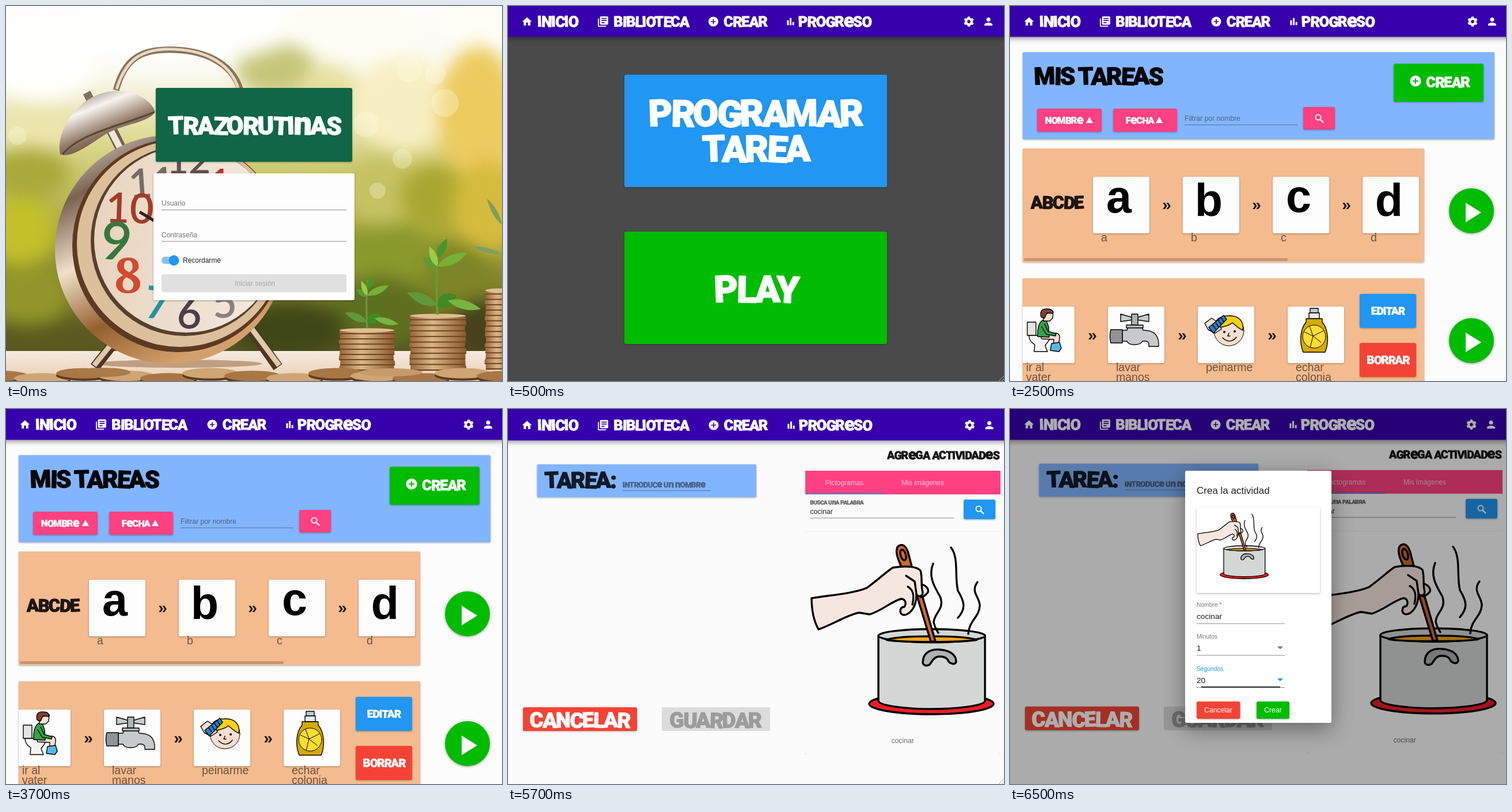
Animation of 861 by 650 pixels, one loop 8000 ms. Source, as an HTML page:

```html
<!DOCTYPE html>
<html lang="es">
<head>
<meta charset="utf-8">
<title>Rutinas</title>
<style>
html, body { margin: 0; width: 100%; height: 100%; overflow: hidden; background: #fcfcfc; }
svg { display: block; width: 100vw; height: 100vh; }
text { font-family: "Liberation Sans", Arial, sans-serif; white-space: pre; }
.d { font-family: Roboto, "Open Sans", sans-serif; font-weight: 900; letter-spacing: -.05em;
  fill: currentColor; stroke: currentColor; stroke-width: .03em; stroke-linejoin: round; }
.d tspan { font-size: 1.3em; letter-spacing: -.04em; }
.sh { filter: drop-shadow(0 1.5px 1.5px rgba(0,0,0,.32)); }
.bar { filter: drop-shadow(0 3px 4px rgba(0,0,0,.4)); }
.big { filter: drop-shadow(0 10px 18px rgba(0,0,0,.4)); }
.blur { filter: blur(15px); }
.ink { stroke: #000; stroke-linejoin: round; stroke-linecap: round; }
</style>
</head>
<body>
<svg id="stage" viewBox="0 0 861 650" preserveAspectRatio="none"></svg>
<script>
const BLUE = '#2196f3', GREEN = '#00bc00', PINK = '#ff4081', RED = '#f44336';

const rect = (x, y, w, h, fill, cls = '', rx = 0) =>
  `<rect x="${x}" y="${y}" width="${w}" height="${h}" rx="${rx}" fill="${fill}" class="${cls}"/>`;
const box = (x, y, w, h, fill) => rect(x, y, w, h, fill, 'sh', 3);
const oval = (x, y, rx, ry, fill, more = '') =>
  `<ellipse cx="${x}" cy="${y}" rx="${rx}" ry="${ry}" fill="${fill}" ${more}/>`;
const path = (d, fill = 'none', stroke = 'none', w = 1, more = '') =>
  `<path d="${d}" fill="${fill}" stroke="${stroke}" stroke-width="${w}" ${more}/>`;
const ink = (d, fill = 'none', w = 1.4) => path(d, fill, '#000', w, 'class="ink"');
const text = (x, y, size, s, fill, more = '') =>
  `<text x="${x}" y="${y}" font-size="${size}" fill="${fill}" ${more}>${s}</text>`;
const MID = 'text-anchor="middle"';
// Display lettering: every glyph leans a little, lowercase forms are drawn at capital height.
const lean = s => [...s].map((_, i) => [-2, 1.5, -1, 2.5][i % 4]).join(' ');
const title = (x, y, size, s, color, more = '') =>
  `<text class="d" x="${x}" y="${y}" font-size="${size}" rotate="${lean(s)}" style="color:${color}" ${more}>` +
  s.replace(/[en]/g, '<tspan>$&</tspan>') + '</text>';
const move = (x, y, s, turn = 0, k = 1) =>
  `<g transform="translate(${x} ${y}) rotate(${turn}) scale(${k})">${s}</g>`;

const ICONS = {
  home: 'M10 20v-6h4v6h5v-8h3L12 3 2 12h3v8z',
  books: 'M4 6H2v14c0 1.1.9 2 2 2h14v-2H4zM20 2H8c-1.1 0-2 .9-2 2v12c0 1.1.9 2 2 2h12c1.1 0 2-.9 2-2V4c0-1.1-.9-2-2-2zm-1 9H9V9h10zm-4 4H9v-2h6zm4-8H9V5h10z',
  add: 'M12 2a10 10 0 1 0 0 20 10 10 0 1 0 0-20zm5 11h-4v4h-2v-4H7v-2h4V7h2v4h4z',
  bars: 'M4 9h4v11H4zM16 13h4v7h-4zM10 4h4v16h-4z',
  person: 'M12 12a4 4 0 1 0 0-8 4 4 0 1 0 0 8zm0 2c-2.67 0-8 1.34-8 4v2h16v-2c0-2.66-5.33-4-8-4z'
};
const icon = (name, cx, cy, size) =>
  move(cx - size / 2, cy - size / 2, path(ICONS[name], '#fff', 'none', 1, 'fill-rule="evenodd"'), 0, size / 24);
const gear = (x, y) => move(x, y,
  '<circle r="5" fill="none" stroke="#fff" stroke-width="4.2"/>' +
  '<circle r="7.4" fill="none" stroke="#fff" stroke-width="2.6" stroke-dasharray="4 3.75" transform="rotate(-106)"/>');
const search = (x, y) => move(x, y,
  '<circle cx="-2" cy="-2" r="4.6" fill="none" stroke="#fff" stroke-width="1.9"/>' +
  path('M1.5 1.5L7 7', 'none', '#fff', 2.4));

function nav(y, crear, prog, right) {
  return rect(-15, -15, 891, y + 41.5, '#3700ad', 'bar') +
    icon('home', 33, y, 20) + title(51, y + 9, 26.5, 'INICIO', '#fff') +
    icon('books', 165, y, 21.5) + title(183.5, y + 9, 25.5, 'BIBLIOTECA', '#fff') +
    icon('add', crear - 18, y, 20.5) + title(crear, y + 9, 25.5, 'CREAR', '#fff') +
    icon('bars', prog - 13.5, y, 18.5) + title(prog, y + 9, 25.5, 'PROGReSO', '#fff') +
    gear(right, y) + icon('person', right + 34, y, 21);
}
const grip = path('M852 650L861 641M857 650L861 646', 'none', '#aaa', 1);

// ---- Login ----
const leaf = (x, y, len, turn, w = 8, fill = '#5d9a32') =>
  move(x, y, path(`M0 0Q${len * .4} ${-w} ${len} 0Q${len * .5} ${w} 0 0Z`, fill), turn);

function stack(x, top, w, bottom) {
  let s = '';
  const n = Math.round((bottom - top) / 9.5), h = (bottom - top) / n;
  for (let i = n - 1; i >= 0; i--) {
    const cx = x + w / 2 + Math.sin(i * 2.3) * 1.2, y = top + i * h;
    s += rect(cx - w / 2, y, w, h + 1, 'url(#coin)', '', 3) + rect(cx - w / 2, y + h - 2, w, 2, '#6d4526');
  }
  return s + oval(x + w / 2, top + 2, w / 2, 3.5, '#e0bf92');
}

function clock() {
  const num = (x, y, size, s, fill, turn = 0, font = 'Lato,sans-serif') =>
    move(x, y, text(0, 0, size, s, fill, `${MID} style="font-family:${font};font-weight:600"`), turn);
  return path('M191 146C204 98 228 77 275 76C340 74 392 96 407 146', 'none', '#8b7359', 11) +
    path('M192 144C206 98 230 77 275 75C340 73 388 96 403 142', 'none', '#e6d9c6', 5) +
    path('M180 208L202 252', 'none', '#75604d', 19) + path('M178 208L200 250', 'none', '#efe6da', 11) +
    path('M152 174L140 150', 'none', '#85715f', 14) +
    path('M94 257C86 216 125 158 176 149C212 141 253 160 259 184C244 204 204 203 170 224C139 245 111 264 94 257Z', 'url(#bell)') +
    path('M98 257C130 219 206 206 257 184', 'none', '#5a4433', 3) +
    path('M208 558L154 626M424 558L472 626', 'none', '#4e3625', 18) +
    path('M204 560L153 623M427 560L474 623', 'none', '#e2c9ab', 9) +
    oval(285, 422, 200, 198, 'url(#rim)') +
    oval(299, 415, 184, 185, '#5c3a22') + oval(302, 412, 179, 179, '#dcbf9b') +
    oval(310, 407, 163, 165, '#58402f') + oval(313, 405, 160, 161, 'url(#face)') +
    num(255, 331, 70, '11', '#756b69', -4) + num(317, 291, 66, '12', '#61504e') +
    num(372, 326, 62, '1', '#b5362c') + num(214, 376, 72, '10', '#a43b2b', 2) +
    num(188, 440, 92, '9', '#35783d', 6) +
    num(212, 497, 84, '8', '#d04a31', 0, 'Noto Serif,serif') +
    num(261, 542, 78, '7', '#2791a9', 6) + num(318, 559, 74, '6', '#4b3f4b') +
    num(381, 540, 74, '5', '#8d807c', -4) +
    path('M232 357L270 380', 'none', '#2a211f', 5);
}

function plant(x, y, h, k) {
  return path(`M${x} ${y}Q${x - 3} ${y - h / 2} ${x + 1} ${y - h}`, 'none', '#689a37', 4 * k) +
    leaf(x, y - 15 * k, 52 * k, -158, 16 * k, '#62973a') + leaf(x, y - 13 * k, 35 * k, -32, 22 * k, '#3f8a22') +
    leaf(x + 16 * k, y - 22 * k, 54 * k, 14, 14 * k, '#78b540') +
    leaf(x, y - h * .66, 28 * k, -145, 13 * k) + leaf(x, y - h * .68, 52 * k, -25, 15 * k, '#76b036') +
    leaf(x, y - h * .68, 34 * k, -112, 11 * k, '#9acb4b') + leaf(x, y - h * .8, 34 * k, -64, 12 * k, '#4e9328');
}

function photo() {
  const glows = [
    [45, 215, 70, 38, '#ede5ad'], [40, 290, 70, 45, '#a9a93c'], [25, 390, 60, 60, '#c3c02b'], [40, 500, 70, 55, '#92962a'],
    [70, 580, 130, 28, '#5a5a20'], [470, 110, 70, 45, '#c6c679'], [560, 170, 60, 70, '#e6e0a0'],
    [690, 170, 90, 80, '#f7efc4'], [820, 190, 70, 120, '#eccb5f'], [650, 320, 60, 60, '#c5c263'], [745, 330, 60, 55, '#a9a730'],
    [835, 350, 60, 80, '#d5bb3d'], [660, 440, 90, 60, '#8a982c'], [650, 530, 90, 60, '#5f6f20'], [490, 560, 100, 45, '#3f4718'],
    [785, 470, 60, 60, '#7c8527'], [830, 560, 60, 50, '#46421c'], [840, 20, 90, 50, '#fffdf5'], [60, 90, 100, 75, '#fffefa'],
    [300, 40, 200, 60, '#fefefc'], [600, 30, 120, 60, '#fefdf4']
  ];
  const spots = [[20, 225, 16], [700, 110, 22], [762, 168, 24], [625, 205, 22], [688, 265, 17], [645, 320, 14], [745, 118, 18]];
  let coins = '';
  for (let i = 0; i < 13; i++) {
    const x = i * 73 - 10, y = 641 + Math.sin(i * 2.1) * 5;
    coins += oval(x, y + 4, 49, 9, '#5f3b20') + oval(x, y, 49, 9, i % 2 ? '#cfa574' : '#a97645');
  }
  return rect(0, 0, 861, 650, 'url(#sky)') +
    `<g class="blur">${glows.map(g => oval(...g)).join('')}</g>` +
    spots.map(([x, y, r]) => oval(x, y, r, r, '#fffbe0', 'opacity=".3"')).join('') +
    rect(0, 598, 861, 52, 'url(#table)') + oval(300, 620, 145, 7, '#a0754f', 'opacity=".6"') + clock() +
    stack(579, 560, 95, 632) + stack(701, 535, 97, 632) + stack(832, 491, 50, 630) +
    plant(627, 559, 84, .8) + plant(749, 535, 123, 1.1) +
    leaf(862, 430, 56, -166, 8, '#79a064') + leaf(861, 379, 52, -120, 9, '#7ca057') + coins +
    oval(668, 635, 54, 7, '#c69b6b') + oval(168, 635, 48, 8, '#a97b48');
}

const defs = `<defs>
<linearGradient id="sky" x2="0" y2="1"><stop stop-color="#fefefd"/><stop offset=".18" stop-color="#fbfaf0"/>
<stop offset=".38" stop-color="#d9d587"/><stop offset=".62" stop-color="#a5a434"/><stop offset=".9" stop-color="#55571f"/></linearGradient>
<linearGradient id="table" x2="0" y2="1"><stop stop-color="#f6ebe0"/><stop offset="1" stop-color="#e8ceb2"/></linearGradient>
<linearGradient id="coin"><stop stop-color="#98683a"/><stop offset=".4" stop-color="#dcb584"/><stop offset="1" stop-color="#8b5a2f"/></linearGradient>
<linearGradient id="rim" x2=".5" y2="1"><stop stop-color="#f2ece6"/><stop offset=".25" stop-color="#7a6351"/>
<stop offset=".5" stop-color="#f0e0cb"/><stop offset=".75" stop-color="#94602f"/><stop offset="1" stop-color="#d3a06d"/></linearGradient>
<linearGradient id="bell" x2=".6" y2="1"><stop stop-color="#66564b"/><stop offset=".35" stop-color="#f8f3ef"/>
<stop offset=".65" stop-color="#947c6a"/><stop offset="1" stop-color="#4a382c"/></linearGradient>
<linearGradient id="face" x2="1"><stop stop-color="#e9d4be"/><stop offset="1" stop-color="#f3ebe1"/></linearGradient>
<clipPath id="row"><rect x="22" y="472" width="697" height="178"/></clipPath></defs>`;

const login = () => photo() +
  box(260, 142, 341, 128, '#106646') +
  title(431, 222.5, 43, 'TRAZORUTInAS', '#fff', MID) +
  box(256, 290, 349, 220, '#fdfdfd') +
  text(270, 346, 12, 'Usuario', '#757575') + rect(270, 353, 321, 1, '#8a8a8a') +
  text(270, 401, 12, 'Contraseña', '#757575') + rect(270, 407.5, 321, 1, '#8a8a8a') +
  rect(270, 434.5, 29, 12.5, '#86c2ea', '', 6) + `<circle cx="291.5" cy="441" r="9" fill="${BLUE}"/>` +
  text(307, 445, 12, 'Recordarme', '#222') +
  rect(270, 465, 321, 31, '#e0e0e0', '', 3) + text(432, 485, 12, 'Iniciar sesión', '#a9a9a9', MID);

// ---- Home ----
const home = () => rect(0, 0, 861, 650, '#4a4a4a') + nav(27, 374.5, 504, 800) +
  box(202, 119, 456, 195, BLUE) + box(202, 391, 456, 195, GREEN) +
  title(429.5, 208.5, 64, 'PROGRAMAR', '#fff', MID) + title(430, 270, 63.5, 'TAREA', '#fff', MID) +
  title(430, 513.5, 64, 'PLAY', '#fff', MID) + grip;

// ---- Task list ----
const SKIN = '#f8dfcd';
const toilet =
  ink('M30 548H45V571H30Z', '#e4e4e4') + ink('M33 571H70C70 581 62 585 61 589L65 599H42L43 587C36 583 33 577 33 571Z', '#f4f4f4') +
  ink('M52 569L80 567C87 568 87 574 85 582L83 593H75L76 578L55 577Z', SKIN) +
  ink('M72 585L86 583L89 593L85 599L70 597Z', '#58b7e8') +
  ink('M56 545C50 549 47 561 48 573L68 574L67 556L63 545Z', '#35a24a') +
  ink('M60 551L66 564L80 568L79 572L63 569L55 556', '#35a24a') +
  ink('M57 535L58 546L69 546L74 541L75 530Z', SKIN) +
  ink('M54 539C51 528 57 524 65 525C73 525 76 530 74 533L64 532L60 541Z', '#80402c');
const tap =
  ink('M192 534L213 540H220L241 534V547L220 544H213L192 547Z', '#c9cccc') + ink('M211 534H222V553H211Z', '#aeb3b3') +
  ink('M195 562H203C204 551 230 551 231 562C250 562 259 570 258 590H241C242 581 237 580 230 581C226 589 206 589 203 581H195Z', '#c7caca') +
  ink('M175 561H195V584H175C173 578 173 567 175 561Z', '#8f9494') + ink('M202 553H231V558H202Z', '#b8bcbc');
const combing =
  oval(380, 563, 26, 26, SKIN, 'class="ink"') +
  ink('M356 560C353 544 364 537 380 537C397 536 407 547 404 562C395 558 390 552 386 549C377 557 367 555 356 560Z', '#fbd011') +
  ink('M338 550L350 541L362 549L367 560L356 567L344 561Z', SKIN) +
  ink('M345 557L371 536L376 543L353 567Z', '#2581ce') + ink('M352 553L357 560M357 549L362 556M362 545L367 552M367 541L371 547') +
  oval(372, 565, 2, 2, '#000') + oval(390, 564, 2, 2, '#000') +
  ink('M369 575C377 583 386 583 393 574M380 567L378 572H382');
const perfume =
  ink('M521 524H535V532H521Z', '#bfc7ca') + ink('M519 532H537V542H519Z', '#e6ebec') +
  ink('M514 542H542V548C551 558 555 580 547 600H509C501 580 505 558 514 548Z', '#d8a900') +
  oval(528, 573, 20, 20, '#ffdc31', 'class="ink"') +
  ink('M511 565L526 572L544 563M526 572L521 592M526 572L540 583M520 555L526 572', 'none', 1);

const arrow = (x, y) => text(x, y, 28, '»', '#1c1713', MID + ' font-weight="700"');
const play = y => oval(801, y, 43, 43, '#f2f2f2') + oval(801, y, 39, 39, GREEN, 'class="sh"') +
  path(`M791 ${y - 14}V${y + 20}L818 ${y + 3}Z`, '#fff');
const label = (x, y, s) => text(x, y, 19.5, s, '#6f523d');

function list() {
  const abc = [['a', 189, 358], ['b', 345, 364], ['c', 501, 357], ['d', 658, 364]];
  const acts = [['ir al', 'vater'], ['lavar', 'manos'], ['peinarme', ''], ['echar', 'colonia']];
  return rect(0, 0, 861, 650, '#fcfcfc') + nav(27, 376, 506, 803) +
    rect(22, 80, 819, 151, '#82b5ff', 'sh', 2) + title(42, 136.5, 42, 'MIS TAREAS', '#050505') +
    box(666, 100, 156, 66, GREEN) + icon('add', 704, 130, 23) + title(722.5, 141, 25.5, 'CREAR', '#fff') +
    box(47, 178, 112, 40, PINK) + title(61, 204, 16.5, 'NOMBRe', '#fff') + path('M132 203H144L138 192Z', '#fff') +
    box(179, 178, 111, 40, PINK) + title(201, 204, 16, 'FeCHA', '#fff') + path('M253 203H265L259 192Z', '#fff') +
    text(303, 199, 12.2, 'Filtrar por nombre', '#4d6386') + rect(303, 205.5, 196, 1, '#56719a') +
    box(509, 175, 55, 39, PINK) + search(537, 195) +
    rect(22, 247, 697, 197, '#f4bb8f', 'sh', 2) + title(36, 351.5, 31, 'ABCDE', '#1c1512') +
    abc.map(([c, x, y], i) => rect(144 + i * 156, 296, 98, 98, '#fdfdfd', 'sh', 3) +
      text(x, y, 79, c, '#000', MID + ' font-weight="700"') + label(158 + i * 156, 408, c) +
      (i < 3 ? arrow(272 + i * 156, 354) : '')).join('') +
    rect(24, 437, 458, 5, '#c99570', '', 2) + play(355) +
    rect(22, 472, 697, 190, '#f4bb8f', 'sh', 2) +
    '<g clip-path="url(#row)">' + acts.map(([a, b], i) => rect(14 + i * 156, 521, 98, 98, '#fdfdfd', 'sh', 3) +
      label(28 + i * 156, 633, a) + label(28 + i * 156, 650, b) + (i < 3 ? arrow(143 + i * 156, 580) : '')).join('') +
    toilet + tap + combing + perfume + '</g>' +
    box(607, 499, 98, 59, BLUE) + title(656, 535, 18.7, 'EDITAR', '#fff', MID) +
    box(607, 584, 98, 59, RED) + title(656.5, 620.5, 20, 'BORRAR', '#fff', MID) + play(580);
}

// ---- Task editor ----
const pot = (w => {
  const p = (d, fill) => ink(d, fill, w);
  return oval(735, 511, 108, 18, '#f01c24', `class="ink" stroke-width="${w}"`) +
    p('M643 393V506C645 515 695 520 735 520S826 515 828 506V393Z', '#d3d7d6') +
    oval(735.5, 393, 92.5, 11.5, '#d3d7d6', `class="ink" stroke-width="${w}"`) +
    p('M657 400C680 392 790 392 814 400C790 405 680 405 657 400Z', '#f9a51b') +
    p('M720 440C720 421 735 416 749 417C767 418 778 426 778 438C776 444 769 442 765 438C763 431 756 429 749 429C740 429 737 436 732 443C727 446 721 445 720 440Z', '#aeb2b2') +
    p('M710 324L734 403H742L718 320Z', '#d2692a') +
    p('M681 236C689 234 694 243 697 258L703 281L688 286L678 262C673 249 673 238 681 236Z', '#d2692a') +
    move(686, 253, oval(0, 0, 4.5, 9.5, '#d2692a', `class="ink" stroke-width="${w}"`), -16) +
    p('M719 304C727 307 732 314 728 319C725 323 719 326 716 326L710 312Z', '#f6e6e0') +
    p('M527 328C555 323 600 320 623 310C645 294 658 281 668 275C690 271 710 273 716 280C720 294 716 304 720 318C719 326 712 326 709 321C709 336 705 346 697 353C689 359 682 358 681 351C681 345 684 343 688 343C692 337 690 330 683 329C668 332 650 349 628 356L610 353C590 356 565 373 539 382C530 366 527 346 527 328Z', '#f6e6e0') +
    p('M694 308C703 313 706 322 702 339M691 289L706 299L709 321') +
    p('M738 268C728 292 743 312 750 325C759 347 739 354 739 370C741 380 745 384 747 388') +
    p('M769 240C783 258 775 292 781 315C793 335 795 346 781 362') +
    p('M815 300C802 317 819 326 819 341C818 361 800 367 799 390');
})(3.4);

const editor = () =>
  rect(50.5, 96, 380.5, 57, '#82b5ff', 'sh', 2) + title(64, 137, 39, 'TAREA:', '#121a26') +
  title(199, 136, 13.2, 'INTRODUCe Un nOMBRe', '#4a638a') + rect(199, 141, 153, 1, '#56719a') +
  title(658, 87, 19.6, 'AGReGA ACTIVIDADeS', '#151515') +
  rect(516, 107, 339, 41, PINK) + rect(516, 146, 136, 2, '#6478cf') +
  text(550.5, 132, 12, 'Pictogramas', '#ffc2d6') + text(683, 132, 12, 'Mis imágenes', '#ffc2d6') +
  title(524.5, 165.5, 9.8, 'BUSCA UnA PALABRA', '#666') + text(524.5, 182, 12.2, 'cocinar', '#222') +
  rect(524.5, 188.5, 250, 1, '#8a8a8a') + box(791, 157, 55, 34, BLUE) + search(819, 175) +
  rect(516, 212, 339, 1, '#f1f1f1') + pot + text(665.5, 579, 12.2, 'cocinar', '#6c6c6c') +
  rect(515, 597, 3, 1, '#ddd') + rect(852, 597, 3, 1, '#ddd') +
  box(26, 517, 198, 41, RED) + title(124.5, 552, 36.5, 'CANCELAR', '#fff', MID) +
  rect(267, 517, 188, 41, '#dcdcdc', '', 3) + title(360, 552.5, 37, 'GUARDAR', '#9c9c9c', MID);

const paper = rect(0, 0, 861, 650, '#fbfbfb');
const create = () => paper + nav(28, 375, 505, 801.5) + editor() + grip;

// ---- Dialog ----
const field = (y, name, value, color = '#777') => text(324, y, 10.3, name, color) +
  text(324, y + 21, 13.7, value, '#1d1d1d') + rect(324, y + 28.5, 153, 1, '#8d8d8d');
const caret = (y, color) => path(`M464 ${y}H474L469 ${y + 5}Z`, color);

const dialog = () => paper + nav(27, 375, 505, 801) + move(0, -1.2, editor()) +
  rect(0, 0, 861, 650, 'rgba(0,0,0,.32)') +
  rect(304, 107, 254, 437, '#fff', 'big', 3) + text(324, 147, 17, 'Crea la actividad', '#222') +
  rect(324, 171, 214, 148, '#fff', 'sh', 2) + move(121.5, 89, pot, 0, .388) +
  field(343, 'Nombre *', 'cocinar') + field(398, 'Minutos', '1') + field(453.5, 'Segundos', '20', BLUE) +
  caret(411.5, '#777') + caret(467, BLUE) + rect(332, 481, 137, 2, '#20242e') +
  box(324, 507, 75.5, 30, RED) + text(361.5, 526, 12.2, 'Cancelar', '#fff', MID) +
  box(428, 507, 57, 30, GREEN) + text(456.5, 526, 12.2, 'Crear', '#fff', MID);

const LOOP = 8000;
const steps = [[0, login], [500, home], [2500, list], [4500, create], [6500, dialog]];
const stage = document.getElementById('stage');
stage.innerHTML = defs + steps.map(([, draw]) => `<g class="scene" display="none">${draw()}</g>`).join('');
const scenes = stage.querySelectorAll('.scene');

let shown = -1;
const start = performance.now();
function tick() {
  const t = (performance.now() - start) % LOOP;
  const now = steps.filter(([at]) => at <= t).length - 1;
  if (now !== shown) {
    scenes.forEach((g, i) => g.setAttribute('display', i === now ? 'inline' : 'none'));
    shown = now;
  }
  requestAnimationFrame(tick);
}
tick();
</script>
</body>
</html>
```
